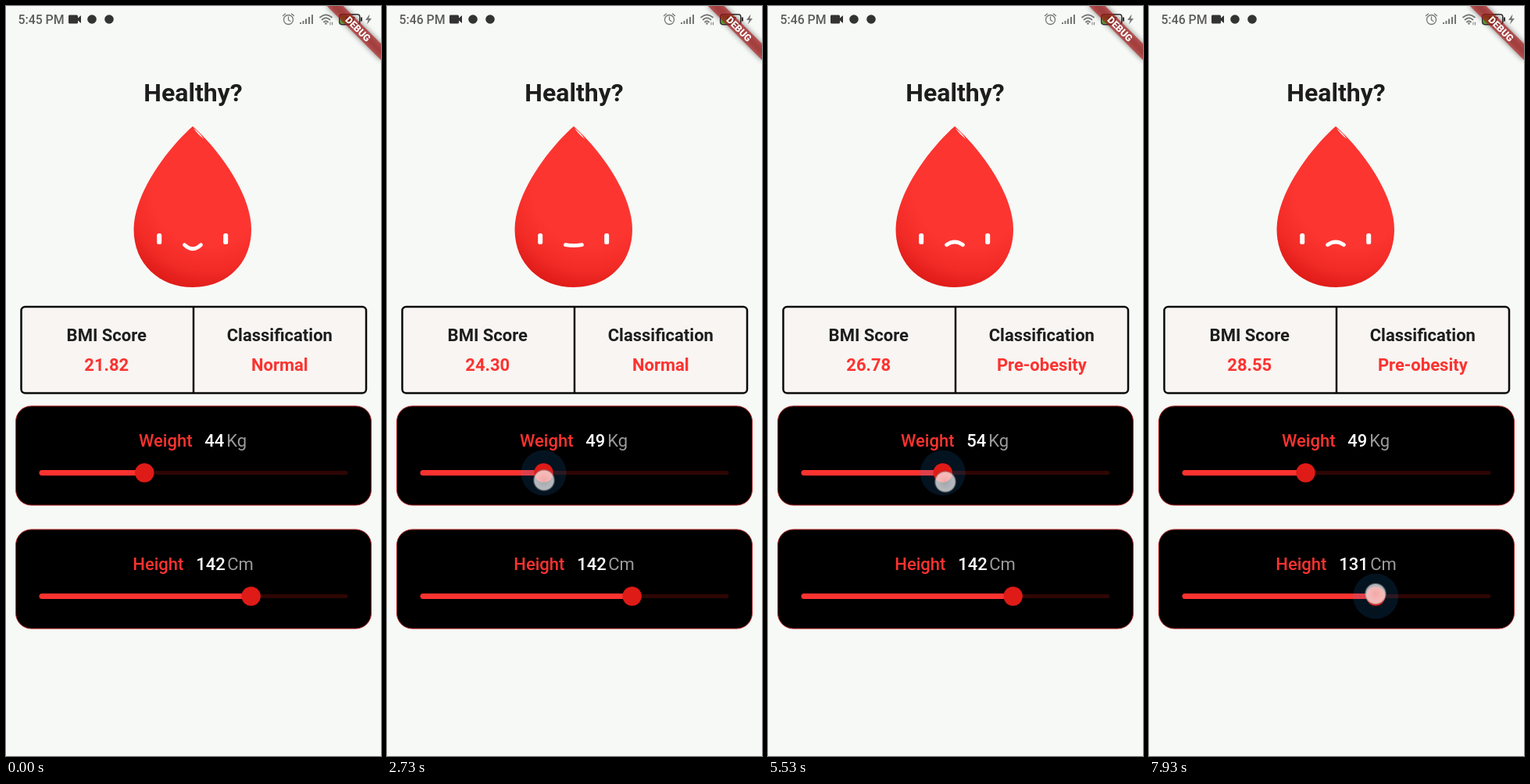
Write an HTML page that moves like this. It is 480 by 960 pixels and loops after 8000 ms.

```html
<!DOCTYPE html>
<html lang="en">
<head>
<meta charset="utf-8">
<title>Healthy?</title>
<style>
  html, body { margin: 0; width: 100%; height: 100%; overflow: hidden; background: #f7f9f6; }
  svg { display: block; width: 480px; height: 960px; font: 500 22px Roboto, sans-serif; }
  .bold { font-weight: 700; fill: #1d1d1d; text-anchor: middle; }
  .red { fill: #fb3330; }
  .unit { fill: #9b9b9b; font-weight: 400; }
  .line { fill: none; stroke: #777; stroke-width: 1.3; stroke-linecap: round; }
</style>
</head>
<body>
<svg viewBox="0 0 480 960">
  <defs>
    <radialGradient id="skin" gradientUnits="userSpaceOnUse" cx="259" cy="235" r="130">
      <stop offset=".55" stop-color="#fc3531"/>
      <stop offset=".8" stop-color="#f22b27"/>
      <stop offset="1" stop-color="#de1b17"/>
    </radialGradient>
    <radialGradient id="finger">
      <stop offset="0" stop-color="#fff" stop-opacity=".62"/>
      <stop offset=".7" stop-color="#fff" stop-opacity=".7"/>
      <stop offset=".86" stop-color="#eee" stop-opacity=".75"/>
      <stop offset="1" stop-color="#777" stop-opacity=".35"/>
    </radialGradient>
    <filter id="blur" x="-20%" y="-100%" width="140%" height="300%"><feGaussianBlur stdDeviation="3.6"/></filter>
  </defs>
  <rect width="480" height="960" fill="#f7f9f6"/>

  <!-- Status bar -->
  <text id="clock" x="15.5" y="22.5" font-size="15.8" fill="#5c5c5c"></text>
  <path d="M81 11.5h9.500q1.500 0 1.500 1.500v2.500l4-3.500v10l-4-3.500v2.500q0 1.500-1.500 1.500h-9q-1.500 0-1.500-1.500v-8q0-1.500 1-1.500z" fill="#333"/>
  <circle cx="110" cy="17" r="5.800" fill="#333"/>
  <circle cx="132" cy="17" r="5.800" fill="#333"/>
  <g class="line">
    <circle cx="361.500" cy="17.500" r="6"/>
    <path d="M361.500 14v4l2.500 1.500M354.500 12.500l3-2.500M368.500 12.500l-3-2.500"/>
    <path d="M377 23v-2M380.500 23v-4M384 23v-6.500M388 23v-9M392 23v-12" stroke-width="2" stroke-linecap="butt"/>
    <path d="M402 14.500q7.500-6.500 15 0M404.500 17.500q5-4.500 10 0M407 20.500q2.500-2.500 5 0" stroke-width="1.800"/>
    <path d="M415 21v3M417.500 21v3" stroke-width="1"/>
  </g>
  <circle cx="409.500" cy="22.500" r="1.300" fill="#777"/>
  <rect x="428" y="12" width="15" height="10.500" fill="#67b52c"/>
  <rect x="426.800" y="10.800" width="26" height="12.800" rx="3" fill="none" stroke="#333" stroke-width="1.600"/>
  <path d="M455 14.500v5" stroke="#333" stroke-width="2"/>
  <text x="434" y="21.500" font-size="11.500" fill="#333">57</text>
  <path d="M465.500 10.500l-5.500 7.500h3.500l-1.500 5.500 6-7.500h-3.500z" fill="#777"/>
  <g transform="translate(480 0) rotate(45)">
    <rect x="-49" y="34.200" width="98" height="14.700" opacity=".5" filter="url(#blur)"/>
    <rect x="-49" y="34.200" width="98" height="14.700" fill="#b71c1c" opacity=".64"/>
    <text y="46" class="bold" style="fill:#fff;font-size:12.400px;font-weight:900">DEBUG</text>
  </g>

  <text class="bold" x="239.500" y="122" font-size="32">Healthy?</text>

  <g id="drop">
    <path d="M239 154C207 182 163.500 240 163.500 286C163.500 330 196 360 239 360C282 360 314 330 314 286C314 240 271 182 239 154Z" fill="url(#skin)"/>
    <path d="M240 156.500Q248 162 253 170Q246 165 240 156.500Z" fill="#fff" opacity=".9"/>
    <rect x="193.200" y="291" width="6" height="14" rx="2.600" fill="#fff"/>
    <rect x="278.200" y="291" width="6" height="14" rx="2.600" fill="#fff"/>
    <path id="mouth" fill="none" stroke="#fff" stroke-width="4.800" stroke-linecap="round"/>
  </g>

  <g stroke="#0a0a0a" stroke-width="2.500">
    <rect x="19.500" y="385" width="441.500" height="110.500" rx="5" fill="#f8f5f2"/>
    <path d="M240 385v110"/>
  </g>
  <text class="bold" x="128.800" y="429">BMI Score</text>
  <text class="bold" x="350.300" y="429">Classification</text>
  <text class="bold" id="score" x="128.800" y="467" style="fill:#fb3330"></text>
  <text class="bold" id="kind" x="350.300" y="467" style="fill:#fb3330"></text>

  <g id="cards"></g>
  <circle id="touch" r="14" fill="url(#finger)"/>
</svg>
<script>
const LOOP = 8000, RESTART = 600, FIRST_SCORE = 2640;
const $ = id => document.getElementById(id);
const set = (id, attrs) => { for (const k in attrs) $(id).setAttribute(k, attrs[k]); };
const clamp = v => Math.min(1, Math.max(0, v));
const ease = v => (v = clamp(v), v * v * (3 - 2 * v));

const sliders = {
  weight: { y: 512, label: 'Weight', unit: 'Kg', xs: [170, 254.3, 282.3], max: 100, press: 2500, release: 7050 },
  height: { y: 670, label: 'Height', unit: 'Cm', xs: [162.3, 243.3, 283.3], max: 200, press: 7230, release: 9000 }
};

// Each drag key: time, finger x, finger y, slider value
const drags = {
  weight: [[2500, 206, 606, 50.4], [2640, 202, 607, 49.9], [2730, 201, 607, 49.2], [3300, 200, 608, 49.1],
    [3900, 203, 609, 49.8], [4290, 210, 609.5, 51], [4530, 213, 609.5, 51.6], [5200, 224, 609, 54],
    [5530, 227, 609, 54.7], [5900, 224, 612, 54], [6300, 212, 615, 51], [6700, 201, 618, 48.5],
    [6930, 201, 618, 48.9], [7000, 201, 618, 49.1]],
  height: [[7230, 314, 753, 142.2], [7390, 308, 753, 139.9], [7800, 305, 753, 138.2],
    [7870, 300, 753, 136], [7930, 290, 752.5, 131.3]]
};

// Mouth curve: 1 smiles, 0 is flat, -1 frowns
const moods = [[RESTART, 0], [2640, 0], [3140, 1], [4280, 1], [4780, -1], [6300, -1], [6800, 1], [7390, 1], [7890, -1]];

function sample(keys, t) {
  const i = keys.findIndex(k => k[0] > t);
  if (i === 0) return keys[0].slice(1);
  if (i < 0) return keys[keys.length - 1].slice(1);
  const a = keys[i - 1], b = keys[i], p = (t - a[0]) / (b[0] - a[0]);
  return a.slice(1).map((v, j) => v + (b[j + 1] - v) * p);
}

$('cards').innerHTML = Object.entries(sliders).map(([id, s]) => `
  <g transform="translate(0 ${s.y})">
    <rect x="12.5" width="455" height="127" rx="20" stroke="#b52b2b" stroke-width="1"/>
    <text class="red" x="${s.xs[0]}" y="51.500">${s.label}</text>
    <text id="${id}Value" x="${s.xs[1]}" y="51.500" fill="#fff"></text>
    <text class="unit" x="${s.xs[2]}" y="51.500">${s.unit}</text>
    <path d="M45 85.500H435" stroke="#2e0604" stroke-width="5" stroke-linecap="round"/>
    <path id="${id}Track" stroke="#fb3330" stroke-width="7" stroke-linecap="round"/>
    <circle id="${id}Halo" cy="85.500" fill="#2196f3" fill-opacity=".13"/>
    <circle id="${id}Thumb" cy="85.500" r="12.200" fill="#de1b17"/>
  </g>`).join('');

function drawSlider(id, value, t) {
  const s = sliders[id], x = 42.5 + 395 * (value - 15) / (s.max - 15);
  const halo = ease((t - s.press) / 110) * (1 - ease((t - s.release) / 130));
  $(id + 'Value').textContent = value;
  set(id + 'Track', { d: `M46 85.500H${x}` });
  set(id + 'Halo', { cx: x, r: 29 * halo });
  set(id + 'Thumb', { cx: x });
}

function draw(t) {
  const before = t < RESTART;
  const weight = before ? 44 : Math.floor(sample(drags.weight, t)[2]);
  const height = Math.floor(sample(drags.height, t)[2]);
  const scored = before || t >= FIRST_SCORE;
  const bmi = weight / (height / 100) ** 2;

  $('clock').textContent = before ? '5:45 PM' : '5:46 PM';
  $('score').textContent = scored ? bmi.toFixed(2) : '0';
  $('kind').textContent = !scored ? '' : bmi < 25 ? 'Normal' : 'Pre-obesity';

  const scale = before ? 1 : ease((t - 900) / 800);
  const mood = before ? 1 : sample(moods, t)[0];
  set('drop', { transform: `translate(239 302) scale(${scale}) translate(-239 -302)` });
  set('mouth', { d: `M228.500 305.700Q239 ${305.7 + mood * (mood > 0 ? 10 : 7.5)} 249.500 305.700` });

  drawSlider('weight', weight, t);
  drawSlider('height', height, t);

  const active = Object.keys(sliders).find(id => t >= sliders[id].press && t < sliders[id].release);
  $('touch').style.display = active ? '' : 'none';
  if (active) {
    const [cx, cy] = sample(drags[active], t);
    set('touch', { cx, cy });
  }
}

const start = performance.now();
function tick() {
  draw((performance.now() - start) % LOOP);
  requestAnimationFrame(tick);
}
tick();
</script>
</body>
</html>
```
